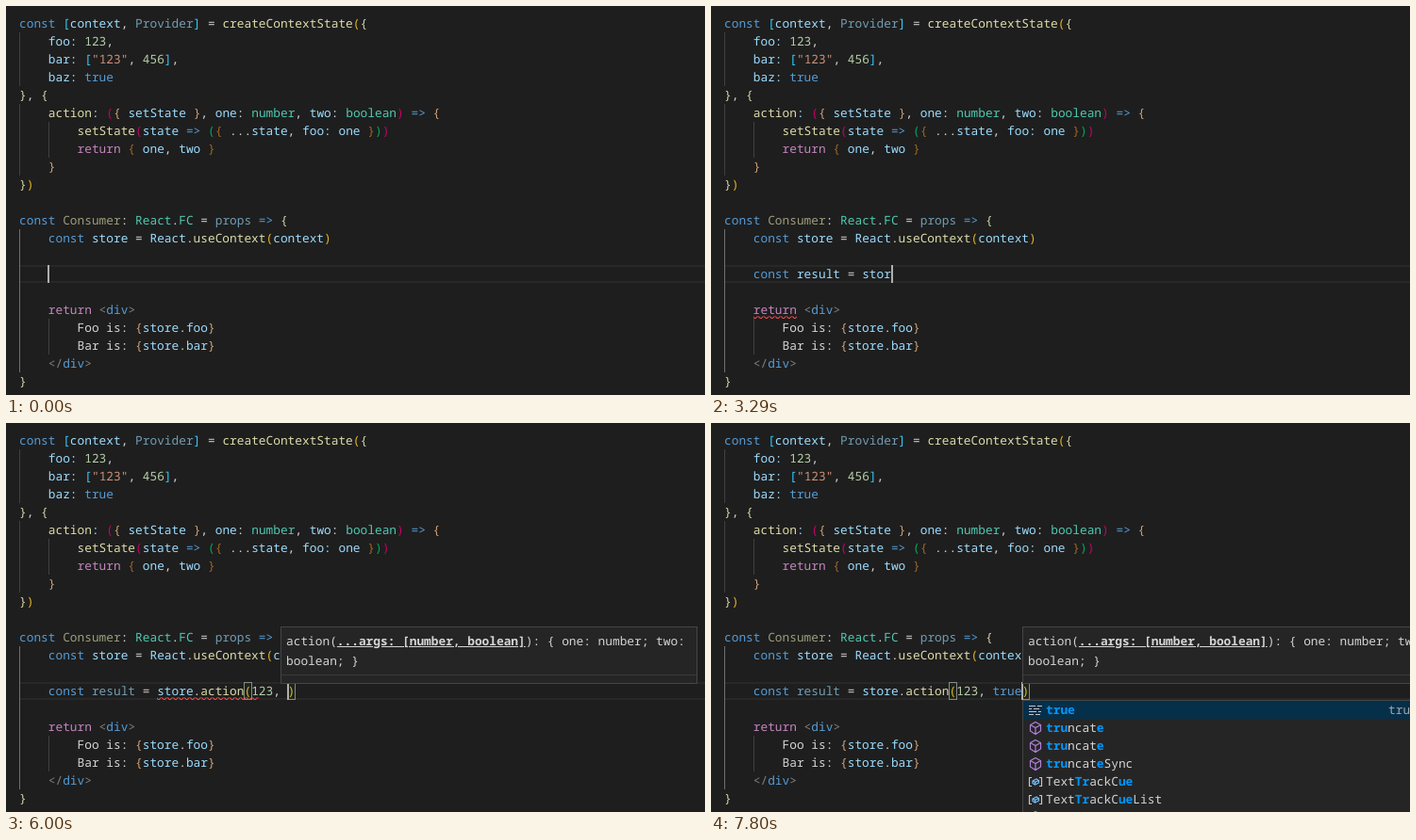
Write an HTML page that moves like this. It is 741 by 413 pixels and loops after 8000 ms.

```html
<!DOCTYPE html>
<html lang="en">
<head>
<meta charset="utf-8">
<title>Typing a typed store action</title>
<style>
  html, body { margin: 0; width: 100%; height: 100%; overflow: hidden; background: #1e1e1e; }
  #stage {
    position: relative; width: 741px; height: 413px; overflow: hidden;
    background: #1e1e1e; color: #d4d4d4;
    font: 12.828px/19px "Noto Sans Mono", "DejaVu Sans Mono", monospace;
    font-variant-ligatures: none; text-rendering: geometricPrecision;
  }
  #stage div, #stage svg { position: absolute; }
  .row { left: 14px; height: 19px; white-space: pre; }
  i { font-style: normal; }
  .k { color: #569cd6; } .v { color: #9cdcfe; } .f { color: #dcdcaa; }
  .t { color: #4ec9b0; } .n { color: #b5cea8; } .s { color: #ce9178; }
  .r { color: #c586c0; } .g { color: #808080; }
  .dim { opacity: .667; font-weight: 500; }
  .p1 { color: #e6b422; } .p2 { color: #c70067; } .p3 { color: #00a960; }
  .q1 { color: #33ccff; }
  .c1 { color: #d4d4aa; } .c2 { color: #d1a075; } .c3 { color: #9c6628; }
  .guide { width: 1px; background: #404040; }
  .on { background: #707070; }
  #current { left: 14px; top: 275px; width: 740px; height: 15px; border: 2px solid #282828; border-left: 0; }
  #caret { top: 275px; width: 2px; height: 19px; background: #aeafad; }
  .match { top: 275px; width: 7px; height: 17px; border: 1px solid #888; background: rgba(0, 100, 0, .1); }
  .wave { height: 3px; }
  #sig {
    top: 216px; width: 440px; height: 59px; border: 1px solid #454545;
    background: #252526; line-height: 21px; white-space: pre;
  }
  #sig p { margin: 4px 5px; }
  #sig b { text-decoration: underline; }
  #sig div { left: 0; right: 0; top: 50px; height: 1px; background: #3a3a3b; }
  #list { left: 330px; top: 294px; width: 430px; height: 230px; border: 1px solid #454545; background: #252526; }
  .item { left: 0; width: 430px; height: 19px; white-space: pre; }
  .item span { position: absolute; left: 24px; }
  .item svg { left: 5px; top: 2px; fill: none; }
  .item b { color: #0097fb; }
  .item em { position: absolute; left: 387px; font-style: normal; color: #a0a8ad; }
  .item:first-child { background: #062f4a; }
</style>
</head>
<body>
<div id="stage"></div>
<script>
const CELL = 7.697, LEFT = 14, TOP = 9, ROW = 19, LOOP = 8000;
const stage = document.getElementById('stage');
const xAt = col => LEFT + col * CELL;

function add(cls, html = '', style = '', parent = stage) {
  const el = document.createElement('div');
  el.className = cls;
  el.innerHTML = html;
  el.style.cssText = style;
  parent.appendChild(el);
  return el;
}

const show = (el, on) => { el.style.visibility = on ? 'visible' : 'hidden'; };
// {class text} marks a coloured token; ~ opens and closes nothing else
const paint = s => s.replace(/\u00ab(\S+) (.*?)\u00bb/g, '<i class="$1">$2</i>');

const code = [
  '«k const» «q1 [»«v context», «v dim»Provider',
];
const T = (cls, text) => `<i class="${cls}">${text.replace(/</g, '&lt;')}</i>`;
const k = s => T('k', s), v = s => T('v', s), f = s => T('f', s), t = s => T('t', s);
const n = s => T('n', s), g = s => T('g', s);
const p = (d, s) => T('p' + d, s), q = s => T('q1', s), c = (d, s) => T('c' + d, s);
const dim = (cls, s) => T(cls + ' dim', s);
const tab = '    ';

const lines = [
  `${k('const')} ${q('[')}${v('context')}, ${dim('v', 'Provider')}${q(']')} = ${f('createContextState')}${p(1, '(')}${c(1, '{')}`,
  `${tab}${v('foo:')} ${n('123')},`,
  `${tab}${v('bar:')} ${q('[')}${T('s', '"123"')}, ${n('456')}${q(']')},`,
  `${tab}${v('baz:')} ${k('true')}`,
  `${c(1, '}')}, ${c(1, '{')}`,
  `${tab}${f('action')}${v(':')} ${p(2, '(')}${c(2, '{')} ${v('setState')} ${c(2, '}')}, ${v('one')}: ${t('number')}, ${v('two')}: ${t('boolean')}${p(2, ')')} ${k('=>')} ${c(2, '{')}`,
  `${tab}${tab}${f('setState')}${p(2, '(')}${v('state')} ${k('=>')} ${p(3, '(')}${c(3, '{')} ...${v('state')}, ${v('foo:')} ${v('one')} ${c(3, '}')}${p(3, ')')}${p(2, ')')}`,
  `${tab}${tab}${T('r', 'return')} ${c(3, '{')} ${v('one')}, ${v('two')} ${c(3, '}')}`,
  `${tab}${c(2, '}')}`,
  `${c(1, '}')}${p(1, ')')}`,
  '',
  `${k('const')} ${dim('f', 'Consumer')}: ${t('React')}.${t('FC')} = ${dim('v', 'props')} ${k('=>')} ${c(1, '{')}`,
  `${tab}${k('const')} ${v('store')} = ${v('React')}.${f('useContext')}${p(1, '(')}${v('context')}${p(1, ')')}`,
  '', '', '',
  `${tab}${T('r', 'return')} ${g('<')}${k('div')}${g('>')}`,
  `${tab}${tab}Foo is: ${c(2, '{')}${v('store')}.${v('foo')}${c(2, '}')}`,
  `${tab}${tab}Bar is: ${c(2, '{')}${v('store')}.${v('bar')}${c(2, '}')}`,
  `${tab}${g('</')}${k('div')}${g('>')}`,
  c(1, '}')
];

add('').id = 'current';
const guide = (x, from, to, on = '') =>
  add('guide ' + on, '', `left:${x}px;top:${TOP + from * ROW}px;height:${(to - from) * ROW}px`);
guide(14, 1, 4);
guide(14, 5, 9);
guide(45, 6, 8);
guide(14, 12, 20, 'on');
guide(45, 17, 19);
lines.forEach((html, i) => add('row', html, `top:${TOP + i * ROW}px`));

// Red error underline
function wave(row, id) {
  const el = add('wave', `<svg width="100%" height="3"><defs><pattern id="${id}" width="6" height="3" patternUnits="userSpaceOnUse">
    <path fill="#f14c4c" d="M5.5 0L2.5 3H1.1L4.1 0ZM4 0L6 2V.6L5.4 0ZM0 2L1 3H2.4L0 .6Z"/></pattern></defs>
    <rect width="100%" height="3" fill="url(#${id})"/></svg>`, `top:${TOP + row * ROW + 16}px`);
  return (from, to) => {
    show(el, to > from);
    el.style.left = xAt(from) + 'px';
    el.style.width = Math.max(0, to - from) * CELL + 'px';
  };
}

const open = add('match', '', `left:${Math.floor(xAt(31))}px`);
const close = add('match');
const typed = add('row', '', 'top:275px');
const lineWave = wave(14, 'w1');
const returnWave = wave(16, 'w2');
const caret = add('');
caret.id = 'caret';

const sig = add('', '<p>action(<b>...args: [number, boolean]</b>): { one: number; two:\nboolean; }</p><div></div>');
sig.id = 'sig';

const list = add('');
list.id = 'list';
const svg = (color, d) => `<svg width="16" height="16" stroke="${color}" stroke-width="1.2"><path d="${d}"/></svg>`;
const word = svg('#c5c5c5', 'M1 3.5H8M10 3.5H15M1 6.5H4M6 6.5H12M1 9.5H9M11 9.5H14M1 12.5H6M8 12.5H13');
const cube = svg('#b180d7', 'M8 1.5L13.5 4.5V11L8 14.5L2.5 11V4.5ZM2.5 4.5L8 7.5L13.5 4.5M8 7.5V14.5');
const box = svg('#c5c5c5', 'M4 3.5H1.5V12.5H4M12 3.5H14.5V12.5H12')
  + svg('#75beff', 'M5 7L9 5L11.5 6.5V9L7.5 11L5 9.5ZM5 7L7.5 8.3L11.5 6.5M7.5 8.3V11');
[
  [word, '<b>true</b>', '<em>true</em>'],
  [cube, '<b>tru</b>ncat<b>e</b>'],
  [cube, '<b>tru</b>ncat<b>e</b>'],
  [cube, '<b>tru</b>ncat<b>e</b>Sync'],
  [box, 'Text<b>Tr</b>ackC<b>ue</b>'],
  [box, 'Text<b>Tr</b>ackC<b>ue</b>List'],
  [cube, '']
].forEach(([icon, text, note = ''], i) =>
  add('item', `${icon}<span>${text}</span>${note}`, `top:${i * ROW}px`, list));

// One time per keystroke of: const result = store.action(123, true
const keys = [
  240, 320, 390, 470, 540, 600,
  1300, 1370, 1430, 1510, 1590, 1660, 1740,
  2020, 2100,
  2830, 3050, 3150, 3290, 3370, 3450,
  3630, 3710, 3800, 3890, 3990, 4090, 4660,
  5120, 5240, 5340, 5480, 6000,
  6470, 6570, 6690, 6810
];
const parts = [
  ['k', 'const'], ['', ' '], ['v', 'result'], ['', ' = '], ['v', 'store'], ['', '.'],
  ['f', 'action'], ['p1', '('], ['n', '123'], ['', ', '], ['k', 'true']
];
const sigMoves = [
  [4740, 260], [5160, 268], [5280, 276], [5390, 283], [5540, 291], [6040, 299],
  [6510, 306], [6610, 314], [6730, 324], [6880, 330]
];
const hidden = [[100, 240], [1100, 1300], [2590, 2830], [7300, 7800]];
const within = (now, [a, b]) => now >= a && now < b;

function lineHtml(count, unused) {
  let left = count, html = tab;
  for (const [cls, text] of parts) {
    if (left <= 0) break;
    const piece = text.slice(0, left);
    left -= text.length;
    const partial = piece !== text && cls === 'k';
    const style = partial ? 'v' : cls + (unused && text === 'result' ? ' dim' : '');
    html += T(style, piece);
  }
  return count >= 28 ? html + p(1, ')') : html;
}

let last = '';
function draw(now) {
  const count = keys.filter(at => at <= now).length;
  const html = lineHtml(count, now >= 4800);
  if (html !== last) typed.innerHTML = last = html;

  const col = 4 + count, x = Math.floor(xAt(col));
  caret.style.left = x + 'px';
  show(caret, !hidden.some(span => within(now, span)));

  show(open, count >= 28);
  show(close, count >= 28);
  close.style.left = x + 'px';

  if (within(now, [1050, 2540])) lineWave(4, 9);
  else if (within(now, [5520, 6140])) lineWave(19, 33);
  else if (within(now, [6140, 7420])) lineWave(19, col + 1);
  else lineWave(0, 0);
  returnWave(4, within(now, [2540, 4840]) ? 10 : 0);

  const move = sigMoves.filter(([at]) => at <= now).pop();
  show(sig, move);
  if (move) sig.style.left = move[1] + 'px';
  show(list, now >= 7040);
}

const start = performance.now();
function tick() {
  draw((performance.now() - start) % LOOP);
  requestAnimationFrame(tick);
}
tick();
</script>
</body>
</html>
```
